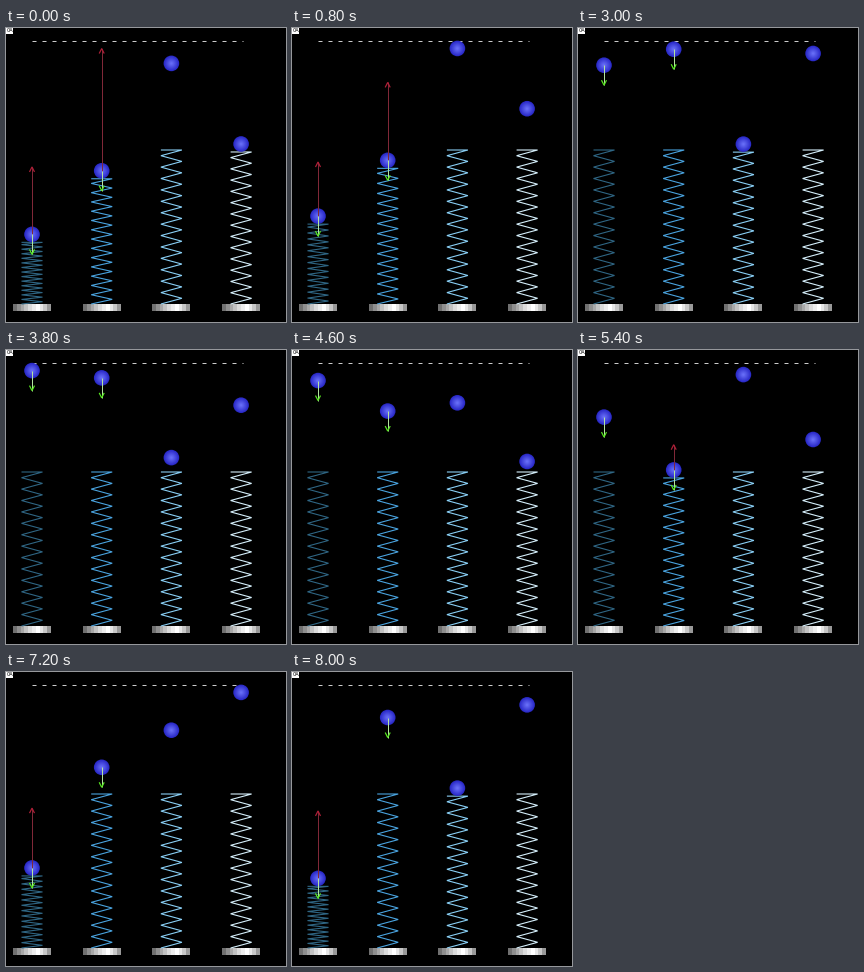
A matplotlib script that plays this animation: 280 px wide and 294 px high, repeating every 8200 ms.

```python
import numpy as np
import matplotlib.pyplot as plt
from matplotlib.animation import FuncAnimation
from matplotlib.colors import to_rgb
from matplotlib.patches import Circle, Rectangle

W, H, DPI = 280, 294, 100
PX = 72 / DPI
FRAMES, STEP = 41, 200

APEX, CONTACT, RADIUS = 20.4, 114.0, 7.8
BASE, HALF_WIDTH, COILS = 276, 10.5, 13.5
LEFT, SPACING = 26, 69.7
GRAVITY = 41.5
FALL = np.sqrt(2 * (CONTACT - APEX) / GRAVITY)
WEIGHT = 20

# colour, apex time, period, deepest compression, force per pixel
SPRINGS = [
    ("#2f6684", 3.90, 8.00, 92.5, 0.73),
    ("#4aa4e0", 3.20, 5.90, 31.0, 4.25),
    ("#8ad0f6", 0.85, 5.00, 14.5, None),
    ("#d6f0fc", 2.505, 4.72, 3.0, None),
]

fig = plt.figure(figsize=(W / DPI, H / DPI), dpi=DPI, facecolor="black")
ax = fig.add_axes([0, 0, 1, 1])
ax.set_xlim(0, W)
ax.set_ylim(H, 0)
ax.axis("off")


def line(color, width=1.0, z=2, x=(), y=()):
    return ax.plot(x, y, color=color, lw=width * PX, zorder=z,
                   solid_capstyle="butt", solid_joinstyle="miter")[0]


def box(x, y, w, h, color):
    ax.add_patch(Rectangle((x, y), w, h, fc=color, lw=0, antialiased=False))


def platform(cx):
    left, width = round(cx - 19), 38
    shades = [0.44, 0.56, 0.66, 0.76, 0.86, 0.93, 1.0, 0.9, 0.78, 0.6]
    edges = np.round(np.linspace(0, width, len(shades) + 1))
    for a, b, s in zip(edges[:-1], edges[1:], shades):
        box(left + a, BASE, b - a, 7, (s, s, s))


def ball_height(t, apex, period, depth):
    """Free flight around the apex, rounded compression on the spring."""
    s = abs((t - apex + period / 2) % period - period / 2)
    if s <= FALL:
        return APEX + GRAVITY * s * s / 2
    u = (s - FALL) / (period / 2 - FALL)
    return CONTACT + depth * (1 - (1 - u) ** 2.2)


class Arrow:
    def __init__(self, shaft, head):
        self.shaft = line(shaft, 1.0, 6)
        self.head = line(head, 1.2, 7)

    def place(self, x, y, length):
        if abs(length) < 1:
            self.shaft.set_data([], [])
            self.head.set_data([], [])
            return
        tip = y + length
        back = tip - np.sign(length) * 5
        self.shaft.set_data([x, x], [y, tip])
        self.head.set_data([x - 2.5, x, x + 2.5], [back, tip, back])


class Bouncer:
    def __init__(self, x, color, apex, period, depth, stiffness):
        self.x, self.motion, self.stiffness = x, (apex, period, depth), stiffness
        platform(x)
        self.spring = line(color, 1.1)
        rim, core = np.array(to_rgb("#2a2ac8")), np.array(to_rgb("#666cf6"))
        self.discs = []
        for k in np.linspace(0, 1, 8):
            disc = Circle((x, 0), RADIUS * (1 - 0.85 * k), lw=0, zorder=4,
                          fc=rim + (core - rim) * k)
            self.discs.append(ax.add_patch(disc))
        self.arrows = None
        if stiffness:
            self.arrows = Arrow("#802838", "#b02038"), Arrow("#b4e4a0", "#58e820")

    def update(self, t):
        y = ball_height(t, *self.motion)
        squeeze = max(0, y - CONTACT)
        ys = np.linspace(CONTACT + 8 + squeeze, BASE, int(2 * COILS) + 1)
        xs = self.x + HALF_WIDTH * (-1.0) ** np.arange(len(ys))
        self.spring.set_data(np.r_[self.x - HALF_WIDTH, xs], np.r_[ys[0], ys])
        for disc in self.discs:
            disc.center = self.x, y
        if self.arrows:
            push, pull = self.arrows
            push.place(self.x, y, -self.stiffness * squeeze)
            pull.place(self.x, y, WEIGHT)


for start in range(26, 237, 10):
    line("#cccccc", 1, 1, [start, min(start + 4, 237)], [12.5, 12.5])

box(0, 0, 7, 6, "white")
ax.text(3.5, 2.9, "0A", color="black", fontsize=5 * PX, ha="center",
        va="center", family="DejaVu Sans")

bouncers = [Bouncer(LEFT + SPACING * n, *spec) for n, spec in enumerate(SPRINGS)]


def update(i):
    for b in bouncers:
        b.update(i * STEP / 1000)
    return []


anim = FuncAnimation(fig, update, frames=FRAMES, interval=STEP,
                     repeat=True, repeat_delay=0, blit=False)
plt.show()
```
